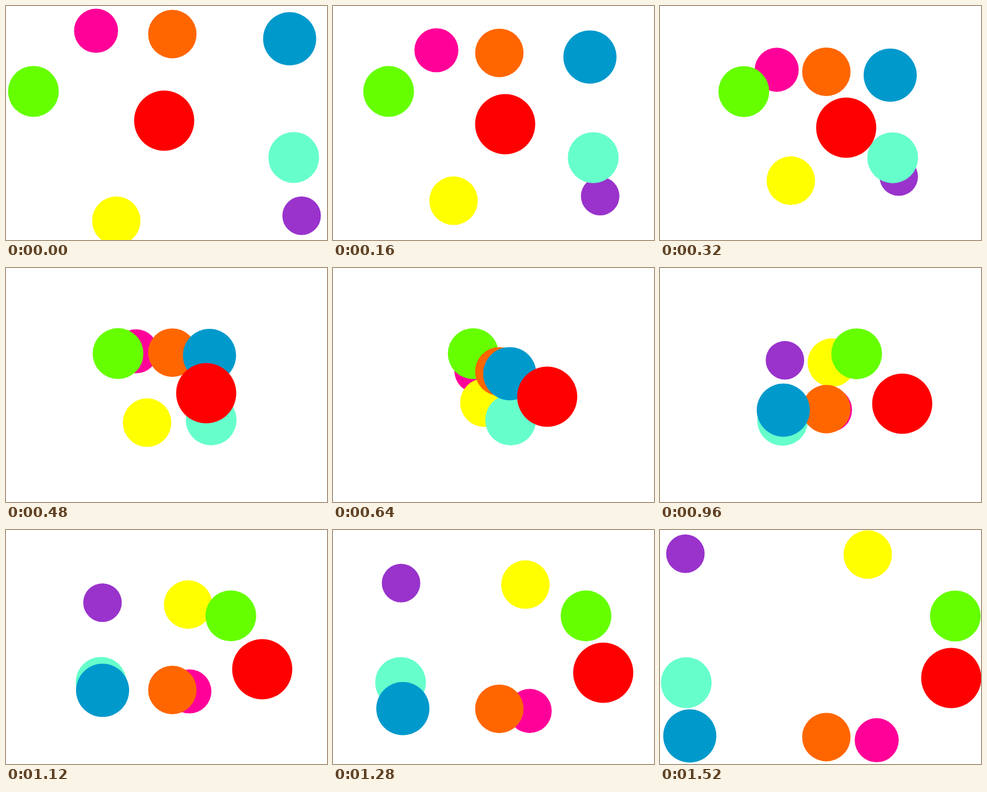
An HTML page with a canvas for the animation above (1.6 s loop, 550 by 400 pixels).

```html
<!DOCTYPE html>
<html lang="en">
<head>
<meta charset="utf-8">
<title>Drifting discs</title>
<style>
  html, body { margin: 0; height: 100%; overflow: hidden; background: #fff; }
  canvas { display: block; }
</style>
</head>
<body>
<canvas id="stage" width="550" height="400"></canvas>
<script>
const ctx = document.getElementById('stage').getContext('2d');
const STEP = 80, STEPS = 20;

// Back to front: colour, radius, start point, end point
const discs = [
  ['#9933cc', 33, 506.5, 358.5, 43.5, 40.5],
  ['#ff0099', 37.7, 154.3, 42.3, 371.3, 359.3],
  ['#ffff00', 41.5, 189, 367, 356, 42],
  ['#66ffcc', 43.5, 493, 259, 45, 261],
  ['#66ff00', 43.5, 47, 146, 506, 147],
  ['#ff6600', 41.5, 285, 48, 285, 354],
  ['#0099cc', 45.5, 486, 56, 51, 352],
  ['#ff0000', 51.5, 271, 196, 499, 253],
];

const mix = (a, b, t) => a + (b - a) * t;

function draw(now) {
  const t = Math.floor(now / STEP) % STEPS / (STEPS - 1);
  ctx.fillStyle = '#fff';
  ctx.fillRect(0, 0, 550, 400);
  for (const [color, r, x0, y0, x1, y1] of discs) {
    ctx.fillStyle = color;
    ctx.beginPath();
    ctx.arc(mix(x0, x1, t), mix(y0, y1, t), r, 0, 2 * Math.PI);
    ctx.fill();
  }
}

const start = performance.now();
function loop() {
  draw(performance.now() - start);
  requestAnimationFrame(loop);
}
loop();
</script>
</body>
</html>
```
